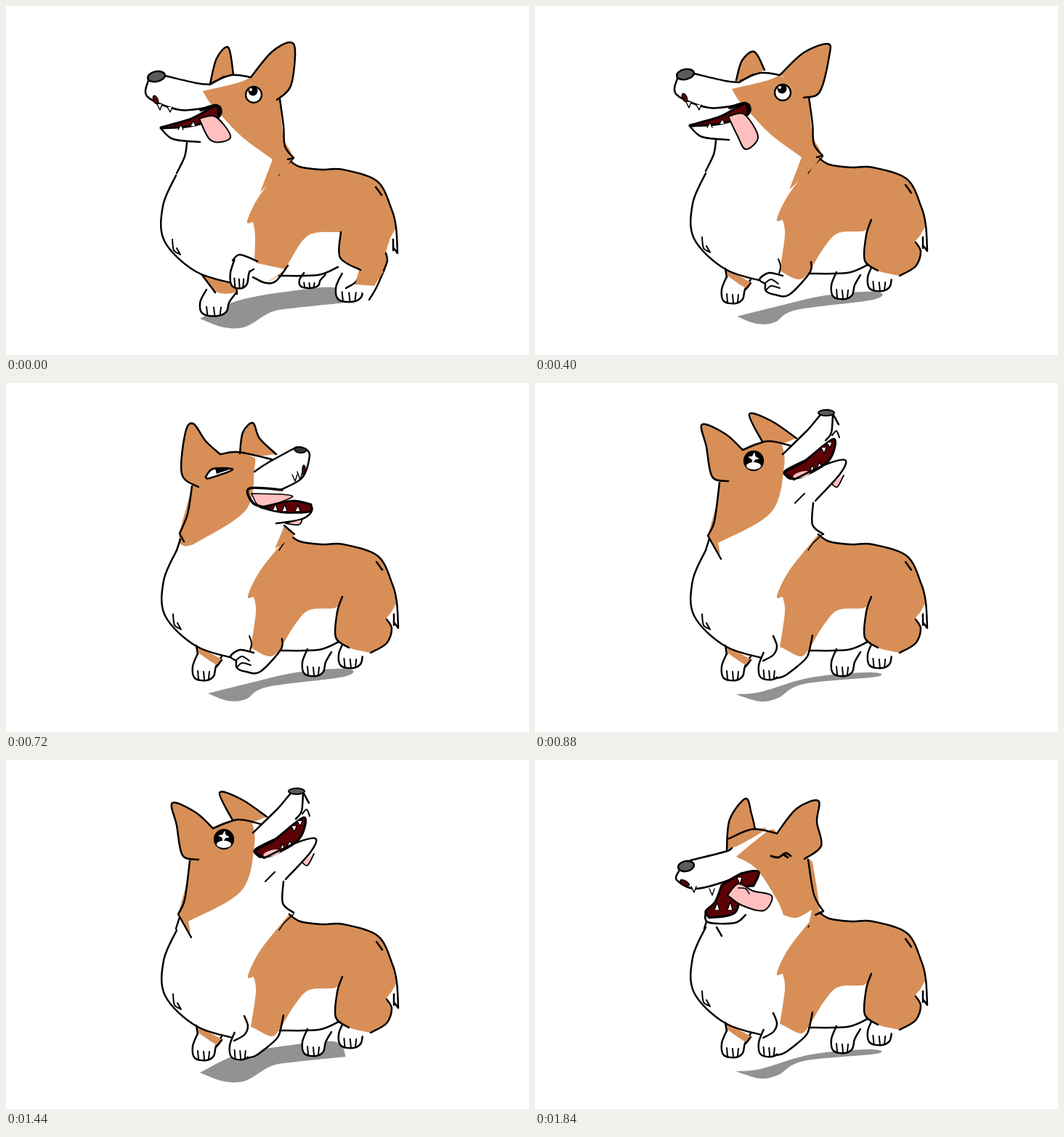
These frames come from a looping animation (720x480 px, 1.92 s). An HTML page with a canvas:

```html
<!DOCTYPE html>
<html lang="en">
<head>
<meta charset="utf-8">
<title>Trotting corgi</title>
<style>
html, body { margin: 0; width: 100%; height: 100%; overflow: hidden; background: #fff; }
canvas { display: block; }
</style>
</head>
<body>
<canvas id="stage" width="720" height="480"></canvas>
<script>
const c = document.getElementById("stage").getContext("2d");
const FUR = "#d78f57", GREY = "#929292", RED = "#5c0207", PINK = "#ffbfbf", NOSE = "#5b5b5b", WHITE = "#fff";
const STEP = 80, COUNT = 24;
c.lineCap = c.lineJoin = "round";

// Smooth curve through points; "/" makes a corner, ";" starts a new stroke.
function trace(text) {
  c.beginPath();
  for (const stroke of text.split(";")) {
    let last;
    for (const run of stroke.split("/")) {
      const n = run.trim().split(/\s+/).map(Number);
      const p = last ? [last] : [];
      for (let i = 0; i < n.length; i += 2) p.push([n[i], n[i + 1]]);
      if (!last) c.moveTo(...p[0]);
      for (let i = 0; i < p.length - 1; i++) {
        const q = p[i], r = p[i + 1], a = p[i - 1] || q, z = p[i + 2] || r;
        c.bezierCurveTo(q[0] + (r[0] - a[0]) / 6, q[1] + (r[1] - a[1]) / 6,
          r[0] - (z[0] - q[0]) / 6, r[1] - (z[1] - q[1]) / 6, ...r);
      }
      last = p[p.length - 1];
    }
  }
}

function ink(color, width) {
  if (color) { c.fillStyle = color; c.fill(); }
  if (width) { c.lineWidth = width; c.stroke(); }
}
function shape(text, color, width = 2.5) {
  trace(text);
  ink(color, width);
}
const paint = (text, color = FUR) => shape(text, color, 0);
const line = (text, width) => shape(text, null, width);

function blob(x, y, rx, ry, turn, color, width) {
  c.beginPath();
  c.ellipse(x, y, rx, ry, turn, 0, 7);
  ink(color, width);
}
const dot = (x, y, r, color, width) => blob(x, y, r, r, 0, color, width);

// Negative height points up.
const tooth = (x, y, h) => shape(`${x - 3} ${y} / ${x + 1} ${y + h} / ${x + 4} ${y}`, WHITE, 1.4);

function star(x, y, r) {
  c.beginPath();
  for (let i = 0; i < 8; i++) {
    const a = i * Math.PI / 4 + 0.15, d = i % 2 ? r * 0.4 : r;
    c.lineTo(x + d * Math.sin(a), y - d * Math.cos(a));
  }
  ink(WHITE);
}

function shifted(x, y, draw) {
  c.save();
  c.translate(x, y);
  draw();
  c.restore();
}

function paw(x, y, sx = 1, sy = 1) {
  const placed = text => {
    c.save();
    c.translate(x, y);
    c.scale(sx, sy);
    trace(text);
    c.restore();
  };
  placed("8 0 1 18 4 34 20 37 30 31 33 18 41 4");
  ink(WHITE, 2.5);
  placed("8 24 9 35; 16 25 17 36; 24 25 23 35");
  ink(null, 2);
}

const BACK = "390 208 405 218 435 222 465 222 512 238 532 277 538 302";

function torso(haunch, flank, belly, leg) {
  paint(`${BACK} / 530 316 / ${haunch} / ${flank} / ${belly} / ${leg} / 344 315 341 294 / 333 293 350 258 390 208`);
  line(`${BACK} 540 337 / 534 329; 518 257 510 246; 534 318 534 333`);
  line(`${haunch}; ${flank}`);
  line("235 230 217 272 219 320 262 362 320 380; 377 368 430 367 458 356");
  line("230 318 232 333 240 338; 236 330 241 339", 2);
  line("396 208 383 220 376 230", 1.5);
}

const wideShadow = () => paint("267 430 300 442 330 441 365 421 400 415 468 408 / 455 388 400 391 320 405 267 430", GREY);

function lowBody(left) {
  wideShadow();
  paw(266, 390, 1.25, 0.98);
  paint("270 370 317 383 / 315 394 289 393 270 370");
  line("270 370 288 394; 317 383 318 396");
  paw(403, 367, 0.9, 0.56);
  paint("488 362 523 362 / 503 402 / 482 390", WHITE);
  paw(453, 368, 1.2, 1.05);
  paint("487 362 522 362 / 506 390 / 496 399 482 382", WHITE);
  line("488 363 482 379 468 388; 521 362 510 387 500 404");
  if (left) paint("486 362 522 362 / 507 385 / 481 383");
  shifted(-1, 3, () => torso("524 337 526 347 521 361", "489 360 461 343 462 308",
    "418 312 391 349 386 361", "358 378 342 371"));
  if (left) paint("342 353 385 362 / 358 380 340 374", WHITE);
  paw(308, 349, 0.8, 1.06);
  paint("328 348 344 352 342 371 336 365", left ? WHITE : FUR);
  line("312 350 322 342 346 351; 388 357 372 378 358 381 340 373; 341 362 336 365");
}

function highBody(tucked) {
  paw(256, 372);
  paint("263 361 297 380 / 291 388 265 371");
  line("262 361 264 373; 290 390 297 381");
  paw(407, 366);
  paw(457, 355, 1.05);
  paint("472 362 502 371 / 497 378 485 372", WHITE);
  torso("524 325 531 338 524 358 502 371", "472 364 454 350 456 315 463 294",
    "454 309 418 312 398 332 380 362", "365 377 337 364");
  if (tucked) {
    paint("341 369 365 376 378 364 / 350 397 318 390 310 374", WHITE);
    line("341 371 322 367 309 376 317 382 / 318 392 330 397 350 397 378 367 380 352");
    line("317 381 325 376 335 382; 318 391 325 385 337 388; 335 348 338 358 336 368", 2);
  } else {
    paw(307, 371, 0.95);
    paint("318 379 332 362 365 376 378 366 / 345 402 334 405 331 385", WHITE);
    line("328 348 333 362 328 374 314 382; 331 406 345 402 372 380 378 367 / 382 347");
  }
}

function body(phase, left) {
  if (phase === 0) return lowBody(left);
  if (phase === 2) {
    wideShadow();
    return shifted(0, 4, () => highBody(false));
  }
  const tucked = phase === 1;
  paint(tucked ? "278 427 305 437 330 435 360 418 465 404 470 393 400 398 330 414 278 427"
    : "276 428 310 438 335 433 370 414 470 404 460 398 380 405 310 425 276 428", GREY);
  highBody(tucked);
}

function leftHead(up) {
  const farEar = up ? "277 105 285 78 302 66 316 91" : "281 107 290 72 306 57 313 94";
  const nearEar = up ? "338 97 370 67 403 55 405 72 392 121 370 129"
    : "337 98 365 64 390 50 398 62 392 110 373 129";
  paint(farEar + " / 281 107");
  paint(nearEar);
  paint("337 98 318 106 271 117 / 280 132 296 150 325 180 367 211 / 350 256 / 392 212 382 180 377 127");
  line(farEar);
  line(nearEar);
  line("283 106 310 95 337 98; 377 128 382 165 384 193 396 209 / 388 211");
  line("219 96 262 106 281 108 / 300 97; 196 102 195 125 240 143 285 138; 249 188 246 207 235 230");
  blob(207, 97, 12, 7, -0.2, NOSE, 2.5);
  blob(206, 129, 3, 6, -0.4, RED, 1.5);
  tooth(211, 135, 8);
  tooth(225, 139, 7);
  shape("213 167 255 155 290 137 293 152 255 165 213 168", RED, 3);
  line("268 143 290 137 293 152", 4);
  tooth(240, 170, -7);
  tooth(257, 165, -7);
  shape(up ? "266 155 288 152 307 183 290 200 278 180 266 155"
    : "266 155 288 152 309 178 297 187 280 183 266 155", PINK, 2);
  line("213 168 230 183 267 187");
  dot(341, 122, 11, WHITE, 2.3);
  dot(340, 117, 6.5, "#000");
  dot(337, 115, 2, WHITE);
}

function rightHead() {
  const farEar = "313 81 295 43 325 52 360 76";
  const nearEar = "266 135 244 129 236 88 230 57 262 70 286 92";
  paint(farEar + " / 340 84");
  paint(nearEar);
  paint("238 210 250 165 254 135 / 286 92 315 81 340 84 / 343 115 325 178 252 220 / 254 236 238 210");
  line(farEar);
  line(nearEar);
  line("286 92 320 80 351 86; 254 137 247 190 238 210 / 256 242; 240 214 235 230");
  line("341 98 375 65 402 37 418 57; 410 43 408 68 400 79");
  blob(401, 41, 11, 4, 0, NOSE, 2);
  shape("344 122 370 108 411 77 405 106 370 128 350 131 344 122", RED, 3);
  line("352 131 344 122 370 108", 4);
  blob(367, 126, 12, 4, -0.25, PINK);
  tooth(397, 89, 8);
  tooth(405, 82, 7);
  tooth(381, 121, -8);
  tooth(391, 116, -7);
  line("409 72 415 66 419 75", 2);
  shape("408 138 416 143 425 127", PINK, 1.8);
  line("356 133 400 112 427 106 420 125 386 162; 383 165 382 195 397 208");
  line("371 152 358 165", 2);
  dot(301, 107, 13, "#000", 2.3);
  blob(301, 114, 10, 5, 0, WHITE);
  star(301, 103, 8);
}

function turningHead() {
  const farEar = "322 97 326 68 340 55 349 76 372 98";
  const nearEar = "265 143 242 125 247 68 258 56 275 80 295 98";
  paint(farEar + " / 345 101");
  paint(nearEar);
  paint("256 141 295 98 / 320 95 343 103 / 342 118 330 175 258 222 / 245 224 238 212 250 165 256 141");
  paint("383 197 396 210 370 228");
  line(farEar);
  line(nearEar);
  line("295 98 320 95 366 105; 256 142 250 180 239 207 / 245 218; 240 215 235 230; 383 196 397 208");
  line("342 122 360 110 400 88; 412 90 418 100 408 130 380 146");
  blob(405, 92, 8, 4, 0.1, "#333", 2);
  blob(410, 120, 2, 7, 0, RED, 1.5);
  tooth(397, 126, 9);
  tooth(404, 122, 11);
  shape("338 152 380 153 / 394 157 352 170 338 152", PINK, 1.5);
  shape("350 171 395 162 420 167 / 418 177 380 178 350 171", RED);
  tooth(370, 175, -9);
  tooth(383, 176, -9);
  tooth(401, 176, -8);
  line("380 147 335 145 340 165 360 172", 3.5);
  line("398 162 420 167 / 420 178 405 188 372 193");
  shape("385 193 408 187 / 403 195 385 193", PINK, 1.8);
  shape("275 129 285 118 312 119 280 131 275 129", WHITE);
  paint("288 118 310 118 / 290 125", "#000");
}

function yawningHead() {
  const farEar = "264 124 268 82 290 53 298 74 303 95";
  const nearEar = "333 101 360 67 390 56 388 85 394 118 371 136";
  paint(farEar + " / 318 95 285 115 264 124");
  paint(nearEar);
  paint("333 101 322 97 277 133 / 305 150 333 192 342 213 / 360 217 381 206 / 378 228 392 212 382 140");
  line(farEar);
  line(nearEar);
  line("267 108 300 95 333 101; 376 137 384 185 397 208 / 386 213");
  line("214 138 262 126 271 121; 198 153 195 165 220 177 262 167 285 155");
  blob(208, 146, 11, 7, -0.2, NOSE, 2.5);
  blob(206, 169, 7, 3, 0.5, RED, 1.5);
  shape("257 172 285 156 308 154 301 173 / 285 178 275 210 240 217 / 235 208 248 195 257 172", RED, 3);
  shape("265 186 280 170 300 180 326 187 315 207 285 200 265 186", PINK, 2);
  line("280 176 290 177 295 184", 1.5);
  tooth(218, 174, 8);
  tooth(243, 177, 9);
  tooth(281, 162, 9);
  tooth(250, 206, -10);
  tooth(268, 206, -11);
  line("235 208 238 223 275 224 290 213; 250 230 257 242; 236 222 233 232");
  line("325 132 335 134 345 128 352 132; 342 130 348 134", 3);
}

function head(n, phase) {
  const up = phase % 2 === 1;
  if (n < 8) return shifted(0, up ? -3 : 0, () => leftHead(up));
  const draw = n === 8 || n === 23 ? yawningHead : n === 9 || n === 22 ? turningHead : rightHead;
  shifted(up ? 0 : -1, up ? 0 : 2, draw);
}

function frame() {
  const n = Math.floor(performance.now() / STEP) % COUNT;
  const phase = n % 4;
  c.fillStyle = WHITE;
  c.fillRect(0, 0, 720, 480);
  body(phase, n < 8);
  head(n, phase);
  requestAnimationFrame(frame);
}
frame();
</script>
</body>
</html>
```
